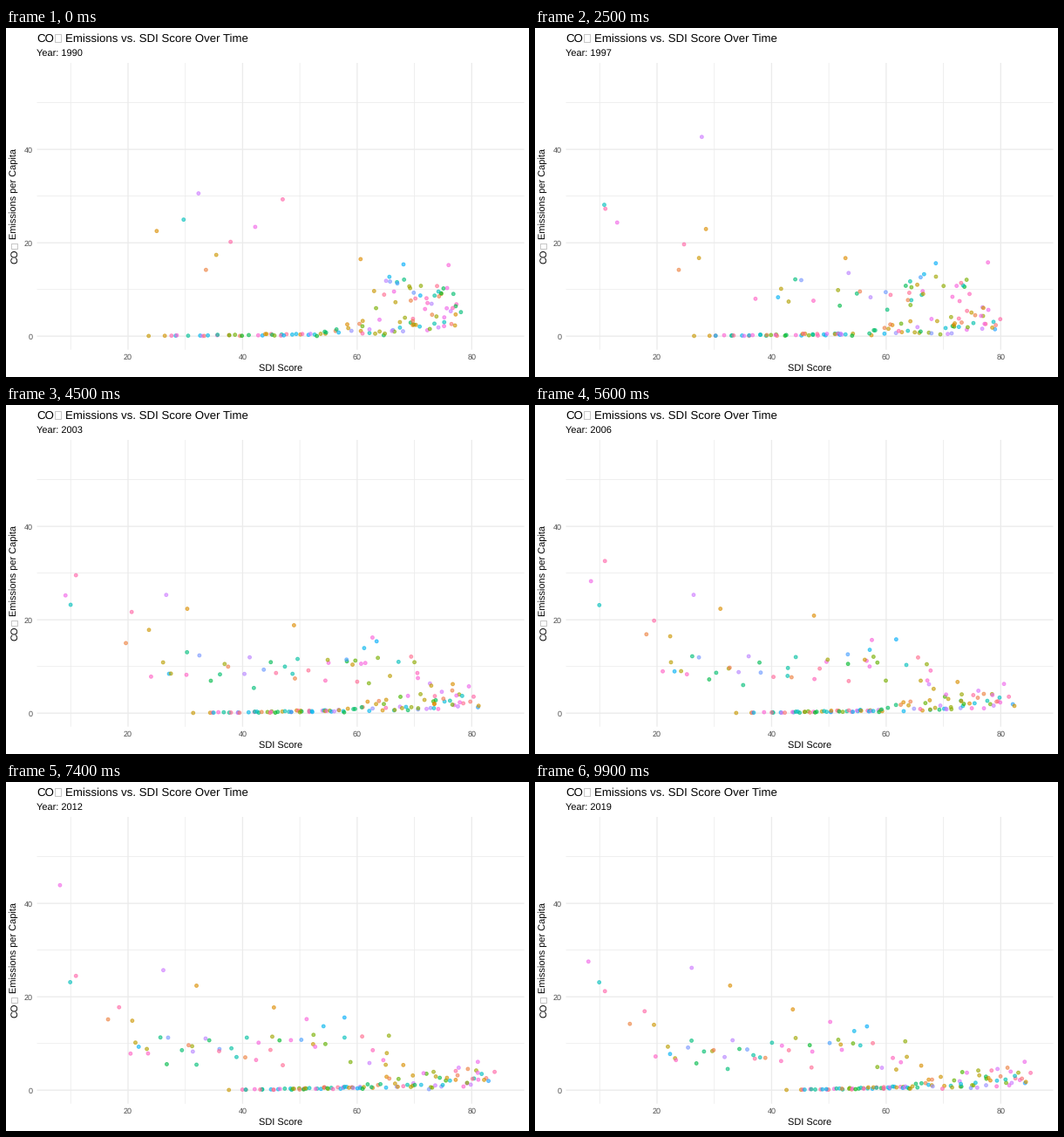
These frames come from a looping animation (600 px wide and 400 px high, 10 s). A matplotlib script:

```python
import numpy as np
import matplotlib.pyplot as plt
from matplotlib.animation import FuncAnimation
from matplotlib.patches import Rectangle

plt.rcParams["font.family"] = "Liberation Sans"
plt.rcParams["text.hinting"] = "none"

FRAMES, YEARS, FIRST = 100, 30, 1990
PX = 72 / 100  # points per pixel at 100 dpi
rng = np.random.default_rng(12)

year_at = np.linspace(0, YEARS - 1, FRAMES)
t = np.linspace(0, FRAMES - 1, YEARS)  # frame at which each year is reached
s = np.linspace(0, 1, YEARS)


def to_px(x, y):
    return 8.6 + 6.571 * np.asarray(x), 353.2 - 5.352 * np.asarray(y)


def hcl(hue, chroma=100, lum=65):
    """Polar LUV colour to sRGB."""
    h = np.radians(hue)
    u = chroma * np.cos(h) / (13 * lum) + 0.1978
    v = chroma * np.sin(h) / (13 * lum) + 0.4683
    Y = ((lum + 16) / 116) ** 3
    X = 9 * u * Y / (4 * v)
    Z = -X / 3 - 5 * Y + 3 * Y / v
    m = [[3.2405, -1.5372, -0.4985], [-0.9693, 1.8760, 0.0416], [0.0556, -0.2040, 1.0572]]
    rgb = np.clip(np.dot(m, [X, Y, Z]), 0, 1)
    return np.where(rgb <= 0.0031308, 12.92 * rgb, 1.055 * rgb ** (1 / 2.4) - 0.055)


def walk(n, size):
    """Slow yearly wobble that stays near zero."""
    steps = rng.normal(0, size, (n, YEARS + 2))
    return (steps[:, :-2] + steps[:, 1:-1] + steps[:, 2:]) / 1.7


def spread(n):
    """Evenly spaced 0..1 column with a little jitter."""
    return ((np.arange(n) + rng.uniform(0.1, 0.9, n)) / n)[:, None]


def emitter(x0, x1, tau, y0, y1, bump, when):
    """Score decays to x1; emissions drift to y1 with one peak."""
    x = x1 + (x0 - x1) * np.exp(-t / tau)
    y = y0 + (y1 - y0) * s + bump * np.exp(-((t - when) / 13) ** 2)
    return x, y


def industrial(n=46):
    """Rich countries slide left one after another, easing out."""
    u = spread(n)
    start = rng.uniform(63, 78, (n, 1))
    end = 20 + 46 * u
    p = np.clip((t - 45 * u) / 60, 0, 1)
    x = start + (end - start) * (1 - (1 - p) ** 2) + walk(n, 0.6)
    y = rng.uniform(4.5, 10, (n, 1)) + rng.exponential(1.8, (n, 1))
    return x, np.maximum(y + 1.2 * np.sin(np.pi * s) - 0.6 * s + walk(n, 0.5), 3.5)


def poor(n=50):
    """A row just above zero that moves right and bunches up."""
    u = spread(n)
    u[0] = 0
    left = 23.6 + 19 * np.clip((t - 16) / 83, 0, 1) ** 0.85
    x = left + (30 - 8 * s) * u ** 0.7 + walk(n, 0.4) * (u > 0)
    y = 0.04 + (0.1 + 0.6 * u) * rng.uniform(0, 1, (n, 1)) + 0.3 * u * s
    return x, np.maximum(y + walk(n, 0.04) * u, 0.03)


def middle(n=54):
    u = spread(n) ** 0.75
    x = 53 + 24.5 * u + s * (10 - 2.5 * u) + walk(n, 0.6)
    y = 0.35 + (1 + 4.5 * u) * rng.uniform(0, 1, (n, 1)) ** 1.3 + 0.5 * u
    return x, np.maximum(y + walk(n, 0.25), 0.2)


# Highest emitters: hue, then the arguments of emitter()
EMITTERS = [
    (348, 47, 10.9, 4, 29.3, 21.2, 8, 56),
    (350, 37.9, 17.5, 24, 20.2, 16.9, 3, 45),
    (312, 42.2, 8, 13, 23.4, 27.1, 18, 74),
    (288, 32.3, 26, 20, 24.2, 26.2, 29, 16),
    (190, 29.7, 9.9, 8, 23.2, 23.1, 8, 16),
    (48, 25, 34, 50, 22.3, 22.4, 1, 16),
    (45, 60.6, 41, 50, 16.5, 17.3, 4, 56),
    (30, 33.6, 14, 36, 14.2, 14.2, 3, 60),
    (60, 35.4, 18, 40, 17.4, 14, 2, 45),
]
groups = [emitter(*e[1:]) for e in EMITTERS] + [industrial(), poor(), middle()]
xs, ys = (np.vstack(part) for part in zip(*groups))
count, top = len(xs), len(EMITTERS)
hues = [e[0] for e in EMITTERS] + list(rng.uniform(15, 375, count - top))


def by_frame(rows):
    return np.array([np.interp(year_at, np.arange(YEARS), r) for r in rows])


px, py = to_px(by_frame(xs), by_frame(ys))

# Some countries join during the first decade
joins = np.where(rng.random(count) < 0.2, rng.uniform(0.5, 10, count), 0)
joins[:top] = 0
px[year_at[None, :] < joins[:, None]] = np.nan

fig = plt.figure(figsize=(6, 4), dpi=100, facecolor="white")
ax = fig.add_axes([0, 0, 1, 1])
ax.set_xlim(0, 600)
ax.set_ylim(400, 0)
ax.axis("off")


def label(x, y, text, size, **kw):
    return ax.text(x, y, text, fontsize=size * PX, **kw)


def tofu(x, y, w, h):
    ax.add_patch(Rectangle((x, y), w, h, fill=False, ec="#999999", lw=0.4))


def grid(xv, yv, width):
    style = dict(color="#EBEBEB", lw=width * PX, zorder=0, solid_capstyle="butt", snap=False)
    for v in to_px(xv, 0)[0]:
        ax.plot([v, v], [40, 368.7], **style)
    for v in to_px(0, yv)[1]:
        ax.plot([35.5, 594.5], [v, v], **style)


grid([10, 30, 50, 70], [10, 30, 50], 0.75)
grid([20, 40, 60, 80], [0, 20, 40], 1.3)

for v in (20, 40, 60, 80):
    label(to_px(v, 0)[0], 380.3, str(v), 9, ha="center", color="#4D4D4D")
for v in (0, 20, 40):
    label(31, to_px(0, v)[1] + 4, str(v), 9, ha="right", color="#4D4D4D")

label(35, 16, "CO", 13.2)
tofu(56.3, 7, 6.8, 9)
label(68.2, 16, "Emissions vs. SDI Score Over Time", 13.2)
year_text = label(35, 32, "", 11)
label(315, 393, "SDI Score", 11, ha="center")

upright = dict(rotation=90, rotation_mode="anchor")
label(13, 270, "CO", 11, **upright)
tofu(5.5, 247, 7.5, 5.7)
label(13, 242.2, "Emissions per Capita", 11, **upright)

# The rim overlaps the translucent fill and reads slightly darker
dots = ax.scatter(px[:, 0], py[:, 0], s=(3.9 * PX) ** 2, c=[hcl(h) for h in hues],
                  alpha=0.6, linewidths=0.94 * PX, edgecolors="face", zorder=3)


def draw(i):
    dots.set_offsets(np.column_stack([px[:, i], py[:, i]]))
    year_text.set_text(f"Year: {FIRST + round(year_at[i])}")
    return dots, year_text


anim = FuncAnimation(fig, draw, frames=FRAMES, interval=100, repeat=True, repeat_delay=0)
plt.show()
```
